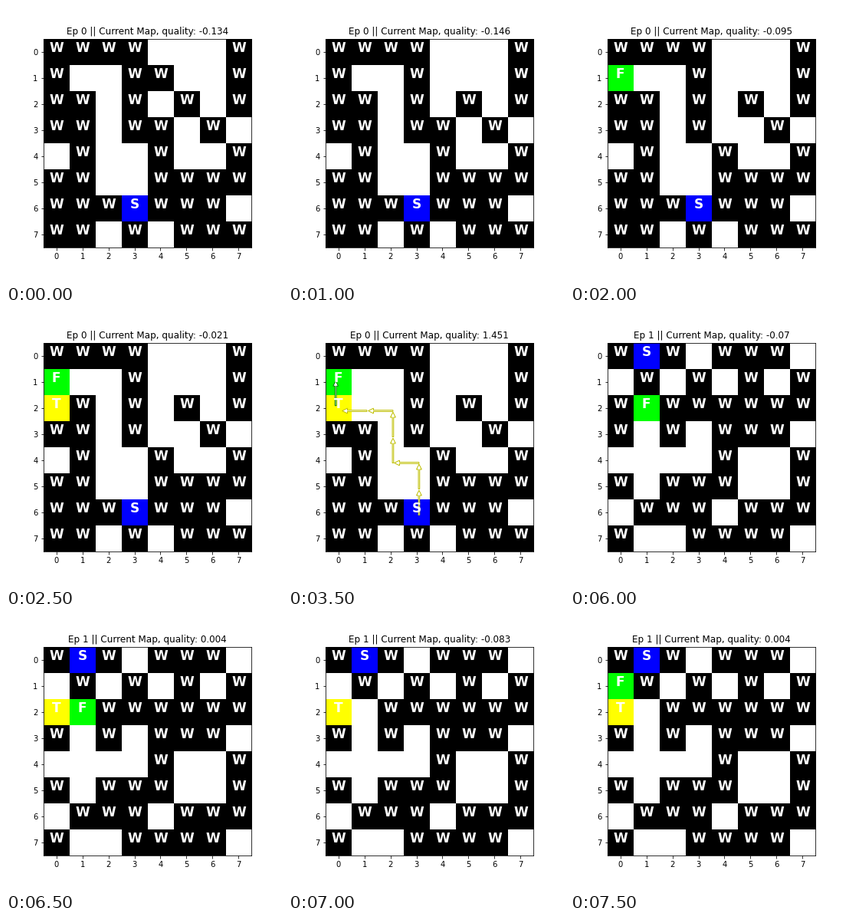
These frames come from a looping animation (360x360 px, 8 s). A matplotlib script:

```python
import matplotlib.pyplot as plt
from matplotlib.animation import FuncAnimation
import numpy as np

plt.rcParams["font.family"] = "DejaVu Sans"

COLORS = {"W": (0, 0, 0), ".": (255, 255, 255), "S": (0, 0, 255),
          "T": (255, 255, 0), "F": (0, 255, 0)}

MAPS = [
    ["WWWW...W", "W..WW..W", "WW.W.W.W", "WW.WW.W.",
     ".W..W..W", "WW..WWWW", "WWWSWWW.", "WW.W.WWW"],
    ["W.W.WWW.", ".W.W.W.W", "WFWWWWWW", "W.W.WWW.",
     "....W..W", "W.WWW..W", ".WWW.WWW", "W..WWWW."],
]

# (ticks held, edit as (row, col, tile), quality, show path)
STEPS = [
    [(2, None, "-0.134", False),
     (1, (1, 4, "."), "-0.146", False),
     (1, (3, 4, "."), "-0.158", False),
     (1, (1, 0, "F"), "-0.095", False),
     (1, (2, 0, "T"), "-0.021", False),
     (1, (2, 1, "."), "1.451", False),
     (3, None, "1.451", True)],
    [(2, None, "-0.146", False),
     (1, (0, 1, "S"), "-0.07", False),
     (1, (2, 0, "T"), "0.004", False),
     (1, (2, 1, "."), "-0.083", False),
     (1, (1, 0, "F"), "0.004", False)],
]

TO_TREASURE = [(3, 6), (3, 5), (3, 4), (2, 4), (2, 3), (2, 2), (1, 2), (0, 2)]
TO_FINISH = [(0, 2), (0, 1)]


def build_ticks():
    ticks = []
    for ep, steps in enumerate(STEPS):
        grid = [list(row) for row in MAPS[ep]]
        for hold, edit, quality, path in steps:
            if edit:
                r, c, tile = edit
                grid[r][c] = tile
            title = f"Ep {ep} || Current Map, quality: {quality}"
            ticks += [([row[:] for row in grid], title, path)] * hold
    return ticks


TICKS = build_ticks()

fig, ax = plt.subplots(figsize=(5, 5), dpi=72)
fig.subplots_adjust(left=0.125, right=0.9, bottom=0.125, top=0.88)


def draw_path(cells, shift, color):
    for (x0, y0), (x1, y1) in zip(cells, cells[1:]):
        ax.arrow(x0 + shift, y0 + shift, 0.75 * (x1 - x0), 0.75 * (y1 - y0),
                 width=0.05, head_width=0.2, head_length=0.2,
                 fc="w", ec=color)


def draw(i):
    grid, title, path = TICKS[i]
    ax.clear()
    ax.imshow(np.array([[COLORS[t] for t in row] for row in grid], dtype=np.uint8),
              interpolation="nearest")
    ax.set_xticks(range(8))
    ax.set_yticks(range(8))
    ax.set_title(title, fontsize=12)
    for r, row in enumerate(grid):
        for c, tile in enumerate(row):
            if tile != ".":
                ax.text(c, r, tile, color="w", fontsize=17, weight="bold",
                        ha="center", va="baseline")
    if path:
        draw_path(TO_TREASURE, 0.1, "y")
        draw_path(TO_FINISH, -0.1, "g")
    ax.set_xlim(-0.5, 7.5)
    ax.set_ylim(7.5, -0.5)
    return []


anim = FuncAnimation(fig, draw, frames=len(TICKS), interval=500,
                     init_func=lambda: [], repeat=True, repeat_delay=0)
plt.show()
```
